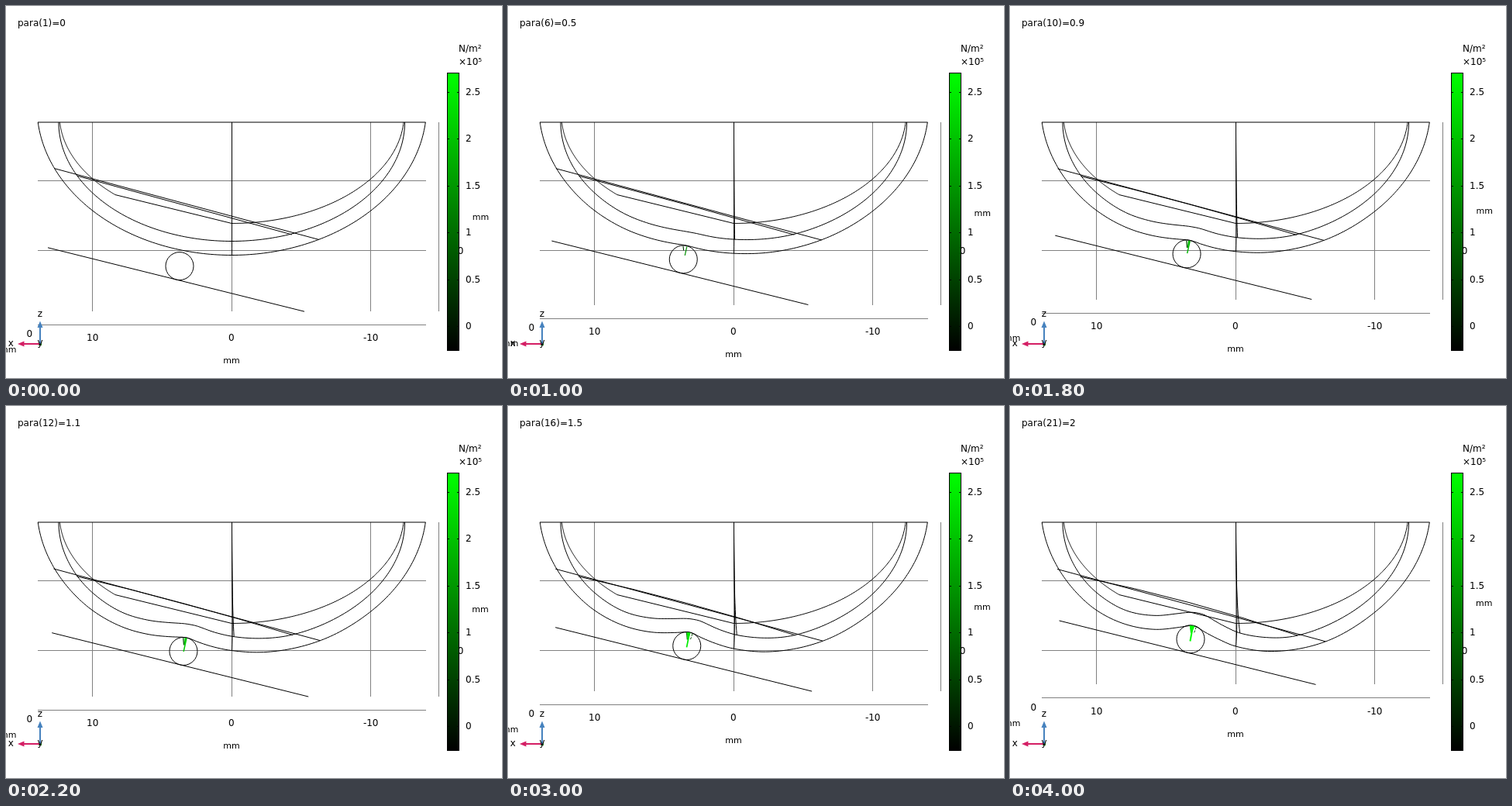
An HTML page that plays this animation: 640x480 px, repeating every 4200 ms.

```html
<!DOCTYPE html>
<html lang="en">
<head>
<meta charset="utf-8">
<title>Pressed shell</title>
<style>
  html, body { margin: 0; width: 100%; height: 100%; overflow: hidden; background: #fff; }
  svg { display: block; width: 640px; height: 480px; }
  text { font: 12px "DejaVu Sans", sans-serif; fill: #000; }
  .unit { font-size: 11px; }
  .mid { text-anchor: middle; }
  .grid { stroke: #808080; shape-rendering: crispEdges; }
  .edge { stroke: #000; fill: none; }
</style>
</head>
<body>
<svg id="stage" viewBox="0 0 640 480">
  <defs>
    <linearGradient id="scale" x1="0" y1="0" x2="0" y2="1">
      <stop offset="0" stop-color="#0f0"/>
      <stop offset="1" stop-color="#000"/>
    </linearGradient>
  </defs>
</svg>
<script>
const STEP_MS = 200, STEPS = 21, RISE = 1.74;
const TOP = 150, MID_X = 291.25;
const stage = document.getElementById('stage');

function add(tag, attrs, text) {
  const el = document.createElementNS('http://www.w3.org/2000/svg', tag);
  set(el, attrs);
  if (text) el.textContent = text;
  return stage.appendChild(el);
}
function set(el, attrs) {
  for (const name in attrs) el.setAttribute(name, attrs[name]);
}
const line = (x1, y1, x2, y2, cls) => add('line', { x1, y1, x2, y2, class: cls });
const label = (x, y, text, cls = '') => add('text', { x, y, class: cls }, text);
const edge = () => add('path', { class: 'edge' });

const outer = { a: 251.4, b: 191.5, y: 130 };
const middle = { a: 223.3, b: 153.5, y: 150 };
const inner = { a: 222.4, b: 140.5, y: 140 };

// Upward shift at full load, as [x, shift]
const outerLift = [[41, 0], [85, -0.5], [112, 0.5], [150, 6.5], [187, 16], [215, 26.5],
  [226, 30.6], [233, 32.9], [240, 32.8], [245, 30.7], [250, 28], [270, 19.5],
  [291, 11.5], [338, 1.6], [407, -4], [470, -2], [542, 0]];
const middleLift = [[67, 0], [92, -0.5], [112, 0.5], [150, 5], [187, 15.4], [215, 26.3],
  [233, 32], [244, 32.6], [252, 31], [275, 19.8], [297, 10.4], [338, 1.1],
  [371, -2.7], [440, -2], [515, 0]];

// Smooth curve through points with unequal spacing
function spline(pts, x) {
  const last = pts.length - 1;
  if (x <= pts[0][0] || x >= pts[last][0]) return 0;
  let i = 0;
  while (pts[i + 1][0] < x) i++;
  const slope = j => {
    const l = pts[Math.max(j - 1, 0)], r = pts[Math.min(j + 1, last)];
    return (r[1] - l[1]) / (r[0] - l[0]);
  };
  const [x0, y0] = pts[i], [x1, y1] = pts[i + 1];
  const h = x1 - x0, u = (x - x0) / h, v = 1 - u;
  return v * v * (1 + 2 * u) * y0 + u * u * (3 - 2 * u) * y1 +
    u * v * h * (v * slope(i) - u * slope(i + 1));
}

function depth(e, x) {
  const r = (x - MID_X) / e.a;
  return e.y + e.b * Math.sqrt(Math.max(0, 1 - r * r));
}

// Points along the shell, evenly spaced in angle
function arc(e, from, to, lift) {
  const n = 160, out = [];
  const angle = x => Math.acos(Math.max(-1, Math.min(1, (MID_X - x) / e.a)));
  const a0 = angle(from), a1 = angle(to);
  for (let i = 0; i <= n; i++) {
    const x = MID_X - e.a * Math.cos(a0 + (a1 - a0) * i / n);
    out.push(x.toFixed(2) + ' ' + (depth(e, x) - lift(x)).toFixed(2));
  }
  return out.join('L');
}
const span = e => e.a * Math.sqrt(1 - ((TOP - e.y) / e.b) ** 2);
const shell = (e, lift) => 'M' + arc(e, MID_X - span(e), MID_X + span(e), lift);

// Grid
const uprights = [111.5, 291.5, 470.5, 558.5].map(x => line(x, TOP, x, 394, 'grid'));
[225.5, 315.5].forEach(y => line(41, y, 542, y, 'grid'));
const floorLine = line(41, 411.5, 542, 411.5, 'grid');

// Geometry
line(41, TOP, 541.5, TOP, 'edge');
const flat = () => 0;
edge().setAttribute('d', 'M' + arc(inner, MID_X - span(inner), 141, flat) +
  'L' + arc(inner, MID_X, MID_X + span(inner), flat));
const outerEdge = edge(), middleEdge = edge();
const chordA = edge(), chordB = edge();
const seamA = edge(), seamB = edge();
const plate = edge();
const ball = add('circle', { r: 18, class: 'edge' });

// Contact arrows
const sideArrow = add('path', { fill: 'none' });
const mainArrow = add('path', { fill: 'none' });
const wedge = add('path', {});
const farArrow = add('path', { fill: 'none', 'stroke-dasharray': '3 1.5' });

// Labels
const title = label(15, 26, '');
const ticks = [[111.7, '10'], [290.7, '0'], [470.7, '-10']].map(([x, s]) => label(x, 432, s, 'mid'));
const unitX = label(291, 461, 'mm', 'unit mid');
const zeroY = label(26.5, 427, '0');
const unitY = label(-8, 447, 'mm', 'unit');
const unitZ = label(602, 276, 'mm', 'unit');
label(582.8, 320, '0');

// Colour scale
add('rect', { x: 569.5, y: 86.5, width: 15, height: 358, fill: 'url(#scale)', stroke: '#000' });
['2.5', '2', '1.5', '1', '0.5', '0'].forEach((s, i) => {
  const y = Math.round(110.8 + i * 60.5);
  line(570, y + .5, 572, y + .5, 'edge');
  line(582, y + .5, 584, y + .5, 'edge');
  label(593, y + 4, s);
});
label(584, 59, 'N/m²');
label(584, 76, '×10⁵');

// Axis triad
const BLUE = '#4682be', PINK = '#d41e64';
add('rect', { x: 42, y: 434, width: 4, height: 4, fill: '#1e8c1e' });
add('path', { d: 'M44 436V414', stroke: BLUE, 'stroke-width': 2 });
add('path', { d: 'M44 406.5L47.5 415H40.5Z', fill: BLUE });
add('path', { d: 'M43 436H22', stroke: PINK, 'stroke-width': 2 });
add('path', { d: 'M15 436L23.5 432.5V439.5Z', fill: PINK });
label(44, 401, 'z', 'mid');
label(44, 438, 'y', 'mid');
label(6.3, 439, 'x', 'mid');

const green = g => `rgb(0,${Math.round(Math.min(255, g))},0)`;

function drawArrows(k, load, cx, cy) {
  const at = (x, y) => `${(cx + x).toFixed(2)} ${(cy + y).toFixed(2)}`;
  const fade = Math.exp(-0.18 * (k - 3));
  const show = k >= 2 ? 'inline' : 'none';
  const tone = green(70 + 125 * Math.sqrt(load) + 80 * load);
  set(mainArrow, {
    d: `M${at(3.9 * fade - 0.7, 3.2 - 11.7 * fade)}L${at(5 - 2 * load, -16.5)}`,
    stroke: tone, 'stroke-width': 1 + load, display: show,
    'stroke-dasharray': k < 5 ? '3 2' : 'none'
  });
  set(sideArrow, {
    d: `M${at(-0.3, -17.3)}L${at(0.3 + 0.5 * load, -17 + 9 * Math.min(1, load * 3))}`,
    stroke: green(50 + 130 * load * load), 'stroke-width': 1 + 0.5 * load, display: show,
    'stroke-dasharray': k < 5 ? '2 2' : 'none'
  });
  const w = 1.3 + 2 * Math.max(0, load - 0.5) * 2.2;
  const x = 4 - 2 * load;
  set(wedge, {
    d: `M${at(x - w, -17.5)}L${at(x + w, -17)}L${at(1.7, -8)}L${at(0.8, -8.5)}Z`,
    fill: tone, display: k >= 9 ? 'inline' : 'none'
  });
  set(farArrow, {
    d: `M${at(7.2, -15.5)}L${at(4.6, -8)}`,
    stroke: green(40 + 60 * load), display: k >= 13 ? 'inline' : 'none'
  });
}

function draw(k) {
  const load = Math.max(0, (k - 1.2) / 18.8);
  const up = RISE * k;
  const cx = 224 + 0.45 * k, cy = 335.6 - up;

  const lifter = pts => {
    const moved = pts.map(([x, d]) => [x > 150 && x < 290 ? x + cx - 233 : x, d * load]);
    return x => spline(moved, x);
  };
  const liftOuter = lifter(outerLift), liftMiddle = lifter(middleLift);
  outerEdge.setAttribute('d', shell(outer, liftOuter));
  middleEdge.setAttribute('d', shell(middle, liftMiddle));

  chordA.setAttribute('d', `M${62 - load} ${209.5 + load}L${404 + 3 * load} ${301.5 + 2.3 * load}`);
  chordB.setAttribute('d', `M${92 - 1.5 * load} ${219.2 + load}` +
    `Q${230 + load} ${257 - 8 * load} ${369 + 2 * load} ${295 + load}`);

  const seamX = 291.5 + 5.2 * load;
  const seamY = depth(middle, seamX) - liftMiddle(seamX);
  seamA.setAttribute('d', `M291.5 ${TOP}C291.5 220 ${291.5 + 1.5 * load} 265 ${seamX} ${seamY}`);
  const endY = depth(outer, 291.5) - liftOuter(291.5);
  seamB.setAttribute('d', `M291.5 ${TOP}C291.5 220 ${291.5 + 3 * load} 275 291.5 ${endY}`);

  const px = 0.475 * k;
  plate.setAttribute('d', `M${54 + px} ${311.8 - up}L${385 + px} ${394.2 - up}`);
  set(ball, { cx, cy });
  drawArrows(k, load, cx, cy);

  uprights.forEach(el => el.setAttribute('y2', Math.round(394.2 - up)));
  const fy = Math.floor(411.7 - up) + 0.5;
  set(floorLine, { y1: fy, y2: fy });

  title.textContent = `para(${k + 1})=${k / 10}`;
  const drop = y => Math.round(y + 0.3 - up);
  ticks.forEach(el => el.setAttribute('y', drop(432)));
  unitX.setAttribute('y', drop(461));
  zeroY.setAttribute('y', drop(427));
  unitY.setAttribute('y', drop(447));
  set(unitZ, { x: 601.8 - 0.04 * k, y: Math.round(275.6 - up / 2) });
}

let shown = -1;
const start = performance.now();
function tick() {
  const k = Math.floor((performance.now() - start) / STEP_MS) % STEPS;
  if (k !== shown) draw(shown = k);
  requestAnimationFrame(tick);
}
tick();
</script>
</body>
</html>
```
